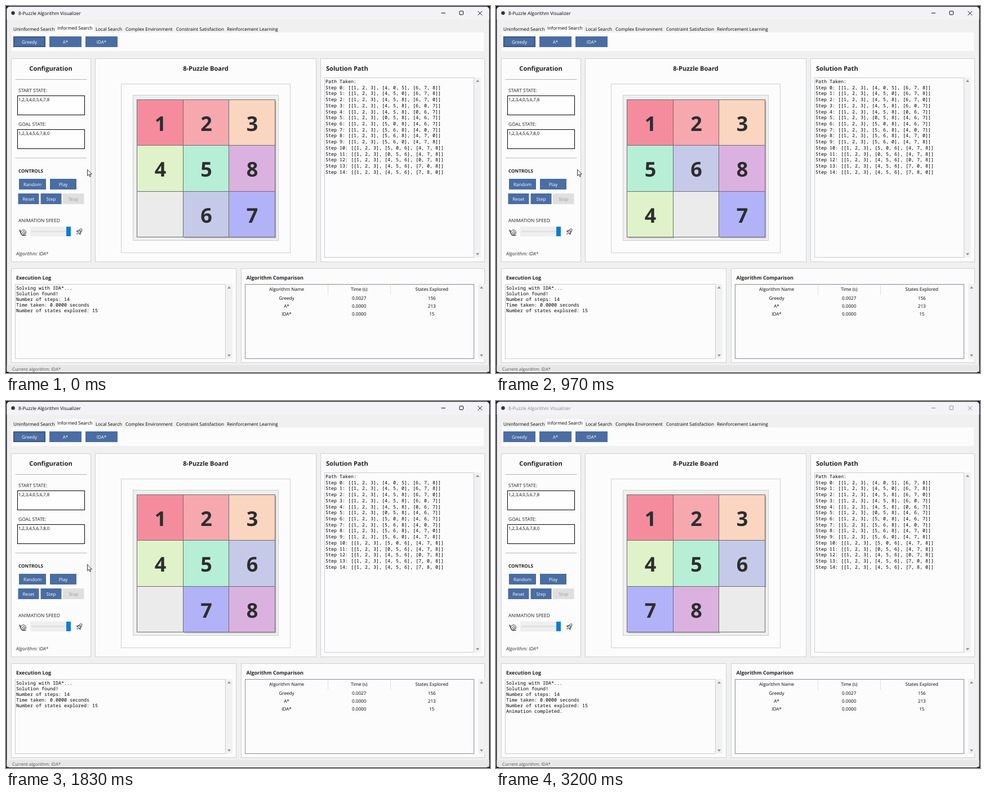
An HTML page that plays this animation: 859 by 652 pixels, repeating every 3.23 s.

```html
<!DOCTYPE html>
<html lang="en">
<head>
<meta charset="utf-8">
<title>8-Puzzle Algorithm Visualizer</title>
<style>
html, body { margin: 0; width: 100%; height: 100%; overflow: hidden; background: #1c1c22; }
svg { display: block; width: 859px; height: 652px; }
text { font-family: "Open Sans", "Noto Sans", sans-serif; font-size: 8.1px; fill: #000;
  text-rendering: geometricPrecision; white-space: pre; }
.mono { font-family: "Noto Sans Mono", "DejaVu Sans Mono", monospace; font-size: 8.33px; font-weight: 500; }
.head { font-weight: 700; font-size: 11.1px; fill: #222; }
.sub { font-weight: 700; font-size: 9px; fill: #222; }
.label { font-size: 8.45px; fill: #222; }
.digit { font-weight: 700; font-size: 36px; fill: #2d2d2d; }
.mid { text-anchor: middle; }
</style>
</head>
<body>
<svg id="stage" viewBox="0 0 859 652" xmlns="http://www.w3.org/2000/svg"></svg>
<script>
const LOOP = 3230;
const FIRST_MOVE = 420, STEP = 190, FIRST_STEP = 4;
const DONE_AT = 2310, CURSOR_OUT = 2280, BLUR_AT = 3160;

const BLUE = '#4a6da3', PANEL = '#fcfcfc', EDGE = '#d0d0d2';
const tileFill = ['#ebebeb', '#f58c9e', '#f6a8ae', '#fad5c0', '#e0f2c9',
  '#b6efd6', '#c5cae8', '#b2b2f9', '#dbb1e0'];

// Place of the empty cell at each step of the solution.
const blanks = [4, 5, 8, 7, 6, 3, 4, 7, 8, 5, 4, 3, 6, 7, 8];
const states = [[1, 2, 3, 4, 0, 5, 6, 7, 8]];
for (let i = 1; i < blanks.length; i++) {
  const s = states[i - 1].slice();
  s[blanks[i - 1]] = s[blanks[i]];
  s[blanks[i]] = 0;
  states.push(s);
}

const rect = (x, y, w, h, fill, stroke = 'none', extra = '') =>
  `<rect x="${x}" y="${y}" width="${w}" height="${h}" fill="${fill}" stroke="${stroke}" ${extra}/>`;
const text = (x, y, str, cls = '', extra = '') =>
  `<text x="${x}" y="${y}" class="${cls}" ${extra}>${str}</text>`;
const path = (d, stroke, extra = '') =>
  `<path d="${d}" fill="none" stroke="${stroke}" ${extra}/>`;
const button = (x, y, w, h, str, fill = BLUE, ink = '#fff') =>
  rect(x, y, w, h, fill) + text(x + w / 2, y + h / 2 + 3, str, 'mid', `style="fill:${ink}"`);
const lines = (x, y, pitch, list) =>
  list.map((s, i) => text(x, y + i * pitch, s, 'mono')).join('');

function scrollbar(x, top, bottom) {
  const c = x + 6;
  return rect(x, top, 12, bottom - top, '#f1f1f1') +
    `<path d="M${c - 3} ${top + 8}h6l-3 -4z M${c - 3} ${bottom - 8}h6l-3 4z" fill="#929292"/>`;
}

function windowFrame() {
  const tabs = [[13, 'Uninformed Search'], [159, 'Local Search'], [212, 'Complex Environment'],
    [302, 'Constraint Satisfaction'], [392, 'Reinforcement Learning']];
  return rect(0, 0, 859, 652, '#1c1c22') +
    rect(1.5, 1.5, 856, 649.5, '#f0f0f0', 'none', 'rx="5"') +
    `<path d="M1.500 24V7q0 -5.500 5 -5.500H852.500q5 0 5 5.500V24z" fill="#f3f3f7"/>` +
    `<circle cx="12.500" cy="12.500" r="3.200" fill="#333"/>` +
    `<g id="caption">` + text(22, 15.6, '8-Puzzle Algorithm Visualizer', '', 'style="font-size:8.28px"') +
    path('M772.5 12.500h7.500 M837.500 9l7.500 7.500 m0 -7.500l-7.500 7.500', '#111') +
    rect(805, 9, 6.5, 6.5, 'none', '#111', 'rx="1"') + `</g>` +
    rect(10, 47, 838, 33, PANEL) + rect(89, 32, 67, 16, PANEL) +
    tabs.map(([x, s]) => text(x, 43.6, s)).join('') + text(91, 42.4, 'Informed Search') +
    button(13, 54, 57, 19, 'Greedy') + button(77, 54, 57, 19, 'A*') + button(141, 54, 57, 19, 'IDA*') +
    `<g id="focus">` + rect(13.5, 54.5, 56, 18, 'none', '#2c4266') +
    rect(15.5, 56.5, 52, 14, 'none', '#3a5580', 'stroke-dasharray="1 1"') + `</g>` +
    rect(1.5, 638, 856, 12, '#e7e7e7') +
    text(11, 647.6, 'Current algorithm: IDA*', '', 'style="font-size:7.8px;fill:#555"');
}

function panels() {
  return [[9.5, 93.5, 141, 361], [158.5, 93.5, 392, 361], [558.5, 93.5, 291, 361],
    [9.5, 466.5, 399, 167], [417.5, 466.5, 432, 167]]
    .map(b => rect(...b, PANEL, EDGE)).join('');
}

function config() {
  const entry = (y, str) => rect(20.5, y, 119, 34, '#fefefe', '#000') +
    text(22, y + 9.6, str, '', 'style="font-size:7.75px"');
  const snail = path('M24 397.500q-.5 3 2 5q0 4 3 5h7 M26 402.500l-1 -5', '#222', 'stroke-width=".9"') +
    `<g fill="none" stroke="#222" stroke-width=".9"><circle cx="31" cy="402.300" r="4.500"/>` +
    `<circle cx="31.500" cy="402.800" r="2"/></g>`;
  const rocket = `<g transform="translate(130 401.500) rotate(45) scale(.9)" fill="none" stroke="#222">` +
    `<path d="M0 -7.500q4 4 2 9.500h-4q-2 -5.500 0 -9.500z M-2.500 -2l-2.500 4.500 3 -.5 M2.500 -2l2.500 4.500 -3 -.5 M-1 3.500v3.500 M1 3.500v2.500"/>` +
    `<circle cx="0" cy="-2.500" r="1.100"/></g>`;
  return text(79.5, 115, 'Configuration', 'head mid') +
    path('M16.500 130.500h127 M16.500 270h127', '#b4b4b4') +
    text(22, 153, 'START STATE:', 'label') + entry(159.5, '1,2,3,4,0,5,6,7,8') +
    text(22, 213.2, 'GOAL STATE:', 'label') + entry(219.5, '1,2,3,4,5,6,7,8,0') +
    text(22, 296, 'CONTROLS', 'sub', 'style="font-size:8.2px"') +
    button(23, 307, 48, 19, 'Random') + button(78, 307, 47, 19, 'Play') +
    button(21.5, 333, 37, 19, 'Reset') + button(61.5, 333, 37, 19, 'Step') +
    button(101, 333, 37.5, 19, 'Stop', '#dfdfdf', '#9a9a9a') +
    text(22, 383.6, 'ANIMATION SPEED', 'label') +
    rect(43, 391.5, 72, 18, '#efefef') + rect(45, 399, 62, 3, '#e2e2e2') +
    rect(107, 392, 8, 17, '#0f7cd4') + snail + rocket +
    text(18, 443, 'Algorithm: IDA*', '', 'style="font-style:italic;font-size:8.4px;fill:#333"');
}

function boardFrame() {
  return text(354.5, 115, '8-Puzzle Board', 'head mid') +
    rect(204.5, 138.5, 300, 300, PANEL, '#cfcfcf') +
    rect(225.5, 158.5, 258, 258, '#efefef', '#cccccc') + `<g id="board"></g>`;
}

function solution() {
  const rows = states.map((s, i) => `Step ${i}: [` +
    [0, 3, 6].map(k => `[${s.slice(k, k + 3).join(', ')}]`).join(', ') + ']');
  return text(568, 115, 'Solution Path', 'head') +
    rect(565.5, 127.5, 265, 319, PANEL, '#c9cbd6') + scrollbar(831, 127, 447) +
    lines(567, 137, 10.72, ['Path Taken:', ...rows]);
}

function log() {
  return text(18, 485.7, 'Execution Log', 'sub') +
    rect(16.5, 494.5, 373, 132, PANEL, '#c9cbd6') + scrollbar(390, 494, 627) +
    lines(18, 504, 10, ['Solving with IDA*...', 'Solution found!', 'Number of steps: 14',
      'Time taken: 0.0000 seconds', 'Number of states explored: 15']) +
    `<g id="done">` + text(18, 554, 'Animation completed.', 'mono') + `</g>`;
}

function table() {
  const rows = [['Algorithm Name', 'Time (s)', 'States Explored'], ['Greedy', '0.0027', '156'],
    ['A*', '0.0000', '213'], ['IDA*', '0.0000', '15']];
  const cols = [498, 626.7, 755.8], base = [506, 521.5, 535.8, 550];
  return text(426.5, 485.7, 'Algorithm Comparison', 'sub') +
    rect(424.5, 494.5, 406, 132, PANEL, '#868ca0') +
    path('M571.500 495v18 M682.500 495v18', '#dedede') + scrollbar(838, 494, 627) +
    rows.map((r, i) => r.map((s, j) => text(cols[j], base[i], s, 'mid')).join('')).join('');
}

const pointer = `<path id="cursor" d="M144.500 290.500v11.200l2.600 -2.400 1.800 4 1.700 -.8 -1.800 -3.800h3.500z"
  fill="#fff" stroke="#222" stroke-width=".9"/>`;

const $ = id => document.getElementById(id);
$('stage').innerHTML = windowFrame() + panels() + config() + boardFrame() +
  solution() + log() + table() + pointer;

function drawBoard(state) {
  const edge = (from, i) => Math.floor(from + i * 81.4) + 0.5;
  let shadows = '', tiles = '';
  state.forEach((n, i) => {
    const col = i % 3, row = Math.floor(i / 3);
    const x = edge(232.8, col), y = edge(166.4, row);
    const w = edge(232.8, col + 1) - x, h = edge(166.4, row + 1) - y;
    if (n) shadows += rect(x + 2, y + 2, w, h, '#b9b9b9');
    tiles += rect(x, y, w, h, tileFill[n], '#6c6c70');
    if (n) tiles += text(x + w / 2 + 0.5, y + 55.9, n, 'digit mid');
  });
  $('board').innerHTML = shadows + tiles;
}

let shown = -1;
const show = (id, on) => $(id).setAttribute('visibility', on ? 'visible' : 'hidden');

function render(t) {
  const moves = t < FIRST_MOVE ? 0 : 1 + Math.floor((t - FIRST_MOVE) / STEP);
  const step = Math.min(FIRST_STEP + moves, states.length - 1);
  if (step !== shown) drawBoard(states[shown = step]);
  show('done', t >= DONE_AT);
  show('cursor', t < CURSOR_OUT);
  show('focus', t < BLUR_AT);
  $('caption').setAttribute('opacity', t < BLUR_AT ? 1 : 0.45);
}

const start = performance.now();
function tick() {
  render((performance.now() - start) % LOOP);
  requestAnimationFrame(tick);
}
tick();
</script>
</body>
</html>
```
